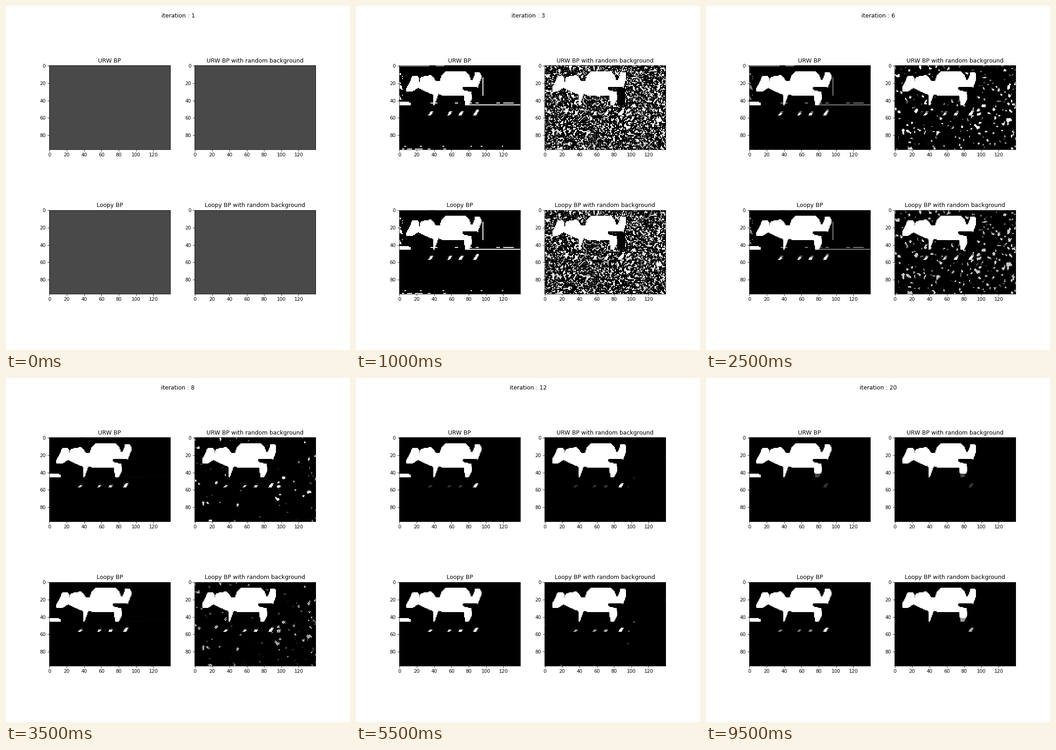
Animation of 748 by 748 pixels, one loop 10 s. Source, as a matplotlib script:

```python
import numpy as np
import matplotlib.pyplot as plt
from matplotlib.animation import FuncAnimation
from matplotlib.path import Path

ROWS, COLS, ITERATIONS = 97, 140, 20
yy, xx = np.mgrid[:ROWS, :COLS]
rng = np.random.default_rng(7)

OUTLINE = [
    (8, 30), (8, 27), (16, 11.5), (22, 11.5), (23.5, 18.5), (25, 13), (37, 11),
    (43, 18.5), (47, 18), (48, 12.5), (54, 7), (77, 7.3), (81, 11), (82, 17),
    (85, 16.5), (87.5, 8.4), (93, 8.4), (95.5, 13), (90.5, 25.5), (73, 25),
    (73, 28), (83, 30.5), (84, 37.5), (80, 46), (76.5, 46), (74.5, 35.4),
    (52, 35.4), (45, 33), (41, 45.5), (39, 45.5), (39.5, 34), (31.5, 31),
    (22, 26), (14, 30.5)]
FEET_X = [35, 57, 70, 87]


def blur(grid, passes=1):
    for _ in range(passes):
        p = np.pad(grid, 1, mode="edge")
        p = (p[:-2] + 2 * p[1:-1] + p[2:]) / 4
        grid = (p[:, :-2] + 2 * p[:, 1:-1] + p[:, 2:]) / 4
    return grid


def sharpen(grid, gain, level):
    return np.clip(0.5 + gain * (grid - level), 0, 1)


def alive(n, lifetime, softness=1.0):
    """Brightness of a part that fades around the given iteration."""
    return 1 / (1 + np.exp((n - lifetime) / softness))


def dashes(row, start, stop, share, run):
    """A one-cell row of random strokes, each a multiple of run cells long."""
    strokes = np.repeat(rng.random(COLS // run + 1) < share, run)[:COLS]
    return (yy == row) & (xx >= start) & (xx < stop) & strokes


def foot(x, height):
    slant = x + 0.6 * (56 - yy)
    return (yy >= 58 - height) & (yy < 58) & (abs(xx - slant) < 1.6)


centres = np.column_stack([xx.ravel() + 0.5, yy.ravel() + 0.5])
body = Path(OUTLINE).contains_points(centres).reshape(ROWS, COLS).astype(float)
leg_tip = (yy >= 42) & (xx >= 75) & (xx < 83)

stump = (yy >= 42) & (yy < 46) & (xx < 8 + 3 * (yy - 41))  & (xx < 13)
line = dashes(45, 77, COLS, 0.94, 3)
left_specks = (blur(rng.random((ROWS, COLS))) > 0.6) & (xx < 4) & (yy > 8) & (yy < 40)
clutter = left_specks | dashes(43, 15, COLS, 0.2, 4) | ((xx == 96) & (yy > 13) & (yy < 35))
edge_specks = dashes(93, 0, 120, 0.13, 2) | dashes(96, 0, 60, 0.2, 3)
top_edge = dashes(0, 0, 52, 0.8, 7)

noise = (rng.random((ROWS, COLS)) < 0.27).astype(float)
hollow = blur(body, 12) > 0.42
shadow = (xx >= 84) & (xx < 93) & (yy >= 26) & (yy < 46)
noise[hollow | shadow] = 0
hot = sum(np.exp(-((xx - x) ** 2 + (yy - y) ** 2) / 6)
          for x, y in [(118, 95), (131, 90), (97, 58)])


def animal(n, loopy, random_bg):
    shape = body * (xx >= 9) * (xx < 94) if random_bg else body
    if n > 4:
        shape = sharpen(blur(shape), 2.6, 0.45)
    lifetime = (13 if random_bg else 20) if loopy else 10
    shape = np.where(leg_tip, shape * alive(n, lifetime + 8, 2), shape)
    for x in FEET_X:
        rear = x == FEET_X[-1]
        level = alive(n, lifetime + 8 * rear, 1.5)
        core = foot(x, 5 if rear else 3) * level
        whole = foot(x, 7 if rear else 5) * level * alive(n, 6)
        shape = np.maximum(shape, np.maximum(core, whole))
    return shape


def plain_scene(n, loopy):
    scene = np.maximum(animal(n, loopy, False), stump)
    for part, lifetime in [(line, 6), (clutter, 6), (edge_specks, 4.5), (top_edge, 7)]:
        scene = np.maximum(scene, part * alive(n, lifetime, 0.5))
    return scene


def noisy_scene(n, loopy):
    speckle = noise
    if n > 2:
        detail = 0.2 * noise if n < 6 else 0
        score = blur(noise, min((n - 1) // 2, 3)) + detail + hot * np.clip((n - 4) / 20, 0, 0.2)
        score[body > 0] = 0
        share = 0.28 * np.exp(-((n - 2) / (3.2 if loopy else 2.75)) ** 1.5)
        speckle = sharpen(score, 14, np.quantile(score, 1 - share))
        if loopy:
            dim = np.interp(n, [4, 8], [0.9, 0.3])
            speckle = speckle * np.where((xx + yy + n) % 2, 1, dim)
        speckle = speckle * min(1, np.exp((8 - n) / (6 if loopy else 4)))
    return np.maximum(speckle, animal(n, loopy, True))


def belief(n, loopy, random_bg):
    if n == 1:
        return np.full((ROWS, COLS), 73 / 255)
    scene = (noisy_scene if random_bg else plain_scene)(n, loopy)
    return 0.09 + 0.81 * scene if loopy and n == 2 else scene


plt.rcParams["font.family"] = "DejaVu Sans"
fig, axes = plt.subplots(2, 2, figsize=(10, 10), dpi=74.8)
heading = fig.suptitle("iteration : 1")
panels = []
for i, ax in enumerate(axes.flat):
    loopy, random_bg = i >= 2, i % 2 == 1
    name = "Loopy BP" if loopy else "URW BP"
    ax.set_title(name + (" with random background" if random_bg else ""))
    image = ax.imshow(belief(1, loopy, random_bg), cmap="gray", vmin=0, vmax=1,
                      interpolation="nearest")
    panels.append((image, loopy, random_bg))


def update(frame):
    n = frame + 1
    heading.set_text(f"iteration : {n}")
    for image, loopy, random_bg in panels:
        image.set_data(belief(n, loopy, random_bg))
    return [heading] + [panel[0] for panel in panels]


anim = FuncAnimation(fig, update, frames=ITERATIONS, interval=500, repeat=True,
                     repeat_delay=0)
plt.show()
```
